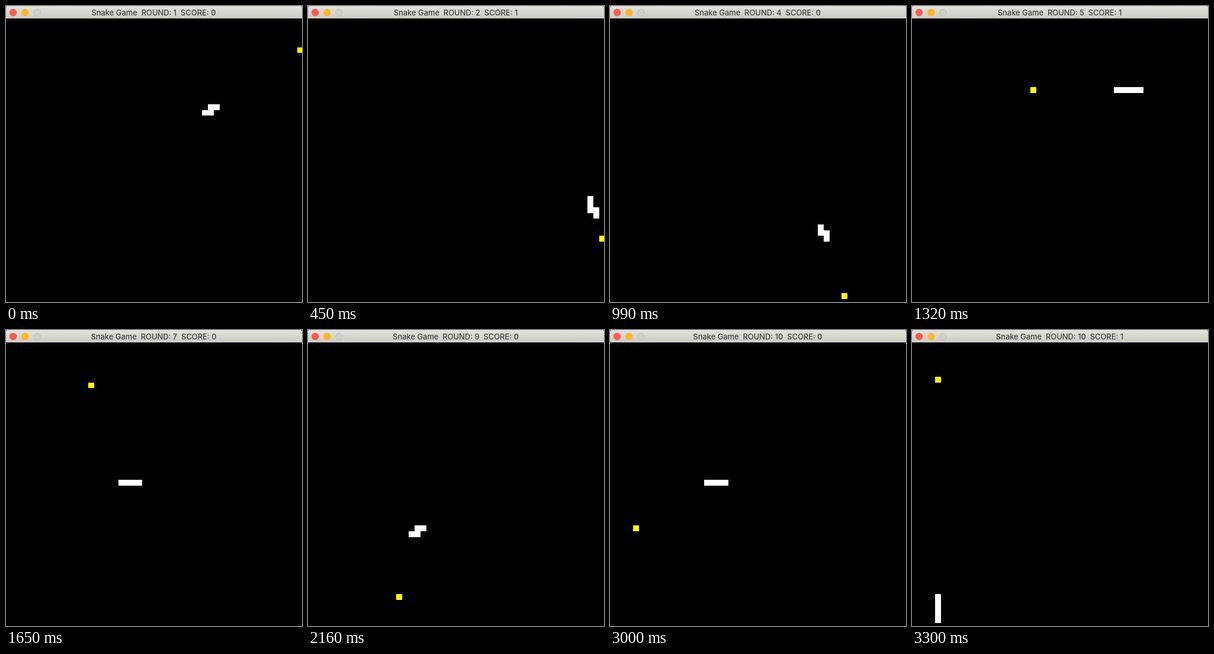
Write an HTML page that moves like this. It is 500 px wide and 500 px high and loops after 3.36 s.

```html
<!DOCTYPE html>
<html lang="en">
<head>
<meta charset="utf-8">
<title>Snake Game</title>
<style>
  html, body { margin: 0; width: 100%; height: 100%; overflow: hidden; background: #000; }
  svg { display: block; width: 100%; height: 100%; }
  text { font: 500 12.9px Inter, Roboto, sans-serif; fill: #40403e; white-space: pre; }
</style>
</head>
<body>
<svg viewBox="0 0 500 500">
  <defs>
    <linearGradient id="bar" x2="0" y2="1">
      <stop offset="0" stop-color="#e2e2dd"/>
      <stop offset="1" stop-color="#cbccc5"/>
    </linearGradient>
  </defs>
  <rect width="500" height="500"/>
  <path d="M0 21V2Q0 0 2 0H498Q500 0 500 2V21Z" fill="url(#bar)"/>
  <circle cx="12" cy="11" r="6.2" fill="#fc5b50"/>
  <circle cx="32.2" cy="11" r="6.2" fill="#fdb52c"/>
  <circle cx="52.5" cy="11" r="5.8" fill="#d0d0ca" stroke="#bcbcb5" stroke-width=".8"/>
  <text id="title" x="249.5" y="15.5" text-anchor="middle"></text>
  <path id="snake" fill="#ffffff"/>
  <path id="food" fill="#ffff00"/>
</svg>
<script>
const TICK = 30, LOOP = 3360, LAST = 110;
const LEFT = [[22, 24], [19, 24]], RIGHT = [[19, 24], [22, 24]];

// at: first tick, speed: cells per tick, body: tail to head,
// turns: [col, row, eats food], next: food left uneaten
const rounds = [
  { at: 0, speed: 4, body: [[33, 16], [35, 15]],
    turns: [[35, 14], [49, 5]], next: [49, 5] },
  { at: 7, speed: 4.5, body: RIGHT,
    turns: [[47, 29, 1], [47, 33], [48, 34], [48, 38], [49, 38]], next: [49, 38] },
  { at: 17, speed: 4, body: LEFT,
    turns: [[12, 10, 1], [12, 0]], next: [12, 30] },
  { at: 26, speed: 4, body: RIGHT,
    turns: [[36, 38], [39, 48]], next: [39, 48] },
  { at: 37, speed: 4, body: RIGHT,
    turns: [[38, 12, 1], [48, 12]], next: [20, 12] },
  { at: 47, speed: 4, body: RIGHT,
    turns: [[30, 40, 1], [30, 48]], next: [30, 20] },
  { at: 55, speed: 4, body: LEFT,
    turns: [[14, 7, 1], [14, 0]], next: [14, 45] },
  { at: 62, speed: 4, body: RIGHT,
    turns: [[26, 7, 1], [26, 0]], next: [26, 28] },
  { at: 69, speed: 11 / 3, body: LEFT,
    turns: [[19, 32], [17, 33], [15, 44, 1], [42, 40, 1], [29, 36], [29, 18, 1], [29, 0]],
    next: [29, 46] },
  { at: 99, speed: 39 / 11, body: LEFT,
    turns: [[12, 24], [4, 32, 1], [4, 48]], next: [4, 6] }
];

// Staircase walk: alternate columns and rows, then go straight.
function walk(cells, [tx, ty]) {
  let [x, y] = cells[cells.length - 1];
  while (x !== tx || y !== ty) {
    if (x !== tx) cells.push([x += Math.sign(tx - x), y]);
    if (y !== ty) cells.push([x, y += Math.sign(ty - y)]);
  }
}

for (const r of rounds) {
  r.cells = [r.body[0]];
  r.meals = [];
  walk(r.cells, r.body[1]);
  r.start = r.cells.length - 1;
  for (const turn of r.turns) {
    walk(r.cells, turn);
    if (turn[2]) r.meals.push({ step: r.cells.length - 1, cell: turn });
  }
}

// Cell edges sit on whole pixels.
const px = c => Math.round(-1.8 + c * 10.08);
const py = r => Math.round(21.2 + r * 9.66);
const box = ([c, r]) => `M${px(c)} ${py(r)}H${px(c + 1)}V${py(r + 1)}H${px(c)}Z`;
const el = id => document.getElementById(id);
const title = el('title'), snake = el('snake'), food = el('food');

function draw(ms) {
  const tick = Math.min(LAST, Math.floor((ms % LOOP) / TICK));
  const index = rounds.filter(r => r.at <= tick).length - 1;
  const r = rounds[index];
  const moved = Math.floor((tick - r.at) * r.speed + 1e-6);
  const head = Math.min(r.cells.length - 1, r.start + moved);
  const score = r.meals.filter(m => m.step <= head).length;
  const tail = Math.max(0, head - 3 - score);
  const meal = r.meals[score];

  snake.setAttribute('d', r.cells.slice(tail, head + 1).map(box).join(''));
  food.setAttribute('d', box(meal ? meal.cell : r.next));
  title.textContent = `Snake Game\u00a0 ROUND: ${index + 1}\u00a0 SCORE: ${score}`;
}

let begin;
function loop(now) {
  begin ??= now;
  draw(now - begin);
  requestAnimationFrame(loop);
}
draw(0);
requestAnimationFrame(loop);
</script>
</body>
</html>
```
